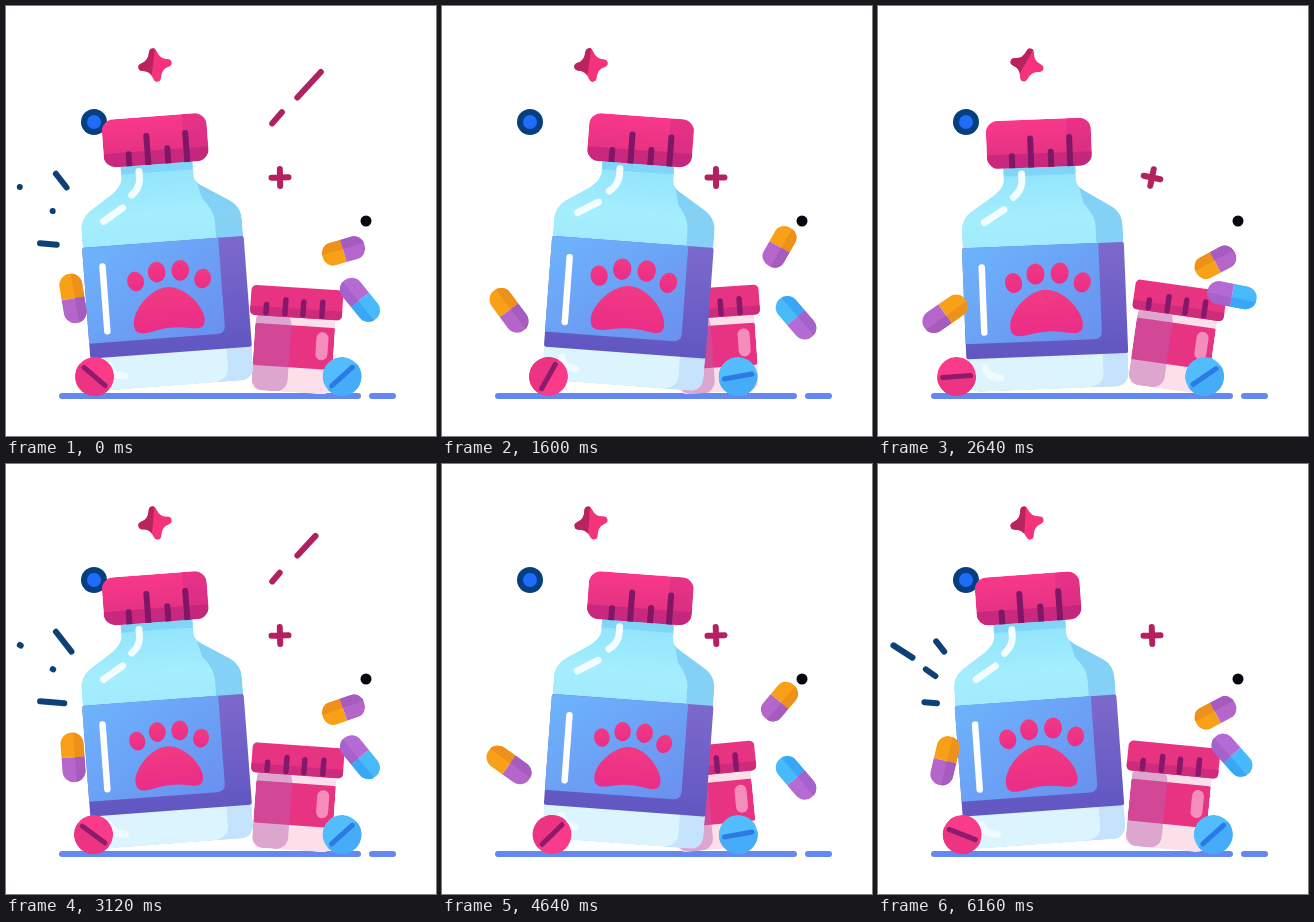
Animation of 430 by 430 pixels, one loop 6.24 s. Source, as an HTML page:

```html
<!DOCTYPE html>
<html lang="en">
<head>
<meta charset="utf-8">
<title>Pet medicine</title>
<style>
html, body { margin: 0; width: 100%; height: 100%; overflow: hidden; background: #fff; }
svg { display: block; width: 100%; height: 100%; }
.line { fill: none; stroke-linecap: round; stroke-linejoin: round; }
</style>
</head>
<body>
<svg viewBox="0 0 430 430">
  <defs>
    <linearGradient id="glassFill" x2="0" y2="1"><stop offset="0" stop-color="#8fe2fc"/><stop offset=".25" stop-color="#a5eefe"/><stop offset="1" stop-color="#8fd2f8"/></linearGradient>
    <linearGradient id="labelFill" x2="1" y2="1"><stop offset="0" stop-color="#6db4fc"/><stop offset="1" stop-color="#6a90ef"/></linearGradient>
    <linearGradient id="sideFill" x2="0" y2="1"><stop offset="0" stop-color="#7d69cc"/><stop offset="1" stop-color="#6157c2"/></linearGradient>
    <linearGradient id="capFill" x2="0" y2="1"><stop offset="0" stop-color="#f9388a"/><stop offset="1" stop-color="#de3082"/></linearGradient>
    <linearGradient id="pawFill" x2="0" y2="1"><stop offset="0" stop-color="#f23a82"/><stop offset="1" stop-color="#ea2d88"/></linearGradient>
    <clipPath id="body"><path d="M-37-224H35V-210C35-202 39-199 46-195L70-180Q80-173 80-160V-16Q80 0 66 0H-66Q-81 0-81-16V-160Q-81-173-71-180L-48-195Q-38-202-37-210Z"/></clipPath>
    <clipPath id="lid"><rect x="-53" y="-270" width="105" height="48" rx="12"/></clipPath>
    <clipPath id="disc"><circle r="19.5"/></clipPath>
    <clipPath id="tube"><rect x="-11.5" y="-25" width="23" height="50" rx="11.5"/></clipPath>
    <clipPath id="jarBody"><path d="M-40-80H40V-10Q40 0 30 0H-30Q-40 0-40-10Z"/></clipPath>
    <clipPath id="starShape"><path d="M0-17Q3-17 4-13Q6-5 13-4Q17-3 17 0Q17 3 13 4Q6 5 4 13Q3 17 0 17Q-3 17-4 13Q-6 5-13 4Q-17 3-17 0Q-17-3-13-4Q-6-5-4-13Q-3-17 0-17Z"/></clipPath>
  </defs>

  <path class="line" stroke="#6488f2" stroke-width="6" d="M56 390H352M366 390H387"/>

  <g id="jar">
    <g clip-path="url(#jarBody)">
      <rect x="-40" y="-80" width="80" height="80" fill="#fbe0ea"/>
      <rect x="-40" y="-67" width="80" height="42" rx="2" fill="#e83383"/>
      <rect x="-40" y="-80" width="36" height="80" rx="12" fill="#b55fae" opacity=".45"/>
      <rect x="22" y="-62" width="12" height="28" rx="6" fill="#f58dba"/>
    </g>
    <rect x="-46" y="-105" width="92" height="30" rx="5" fill="#e83383"/>
    <path d="M-46-84H46V-80Q46-75 41-75H-41Q-46-75-46-80Z" fill="#cf2b7c"/>
    <path class="line" stroke="#85186a" stroke-width="5.5" d="M-30-86V-78M-11-92V-78M7-91V-78M26-92V-78"/>
  </g>

  <circle cx="88" cy="116" r="13" fill="#063f80"/>
  <circle cx="88" cy="116" r="7" fill="#1f6cf8"/>

  <g id="bottle">
    <g id="dashes" class="line"></g>
    <g id="specks" fill="#e09cba"><circle cx="102" cy="-275" r="3.8"/><circle cx="129" cy="-234" r="3.8"/></g>
    <g clip-path="url(#body)">
      <rect x="-81" y="-226" width="162" height="226" fill="url(#glassFill)"/>
      <path d="M-40-226H40V-214H-40Z" fill="#70c8f2" opacity=".5"/>
      <path d="M35-213Q37-201 46-195L95-164V-130H53V-160Q53-172 42-184Z" fill="#78c6f4" opacity=".7"/>
      <rect x="-81" y="-34" width="162" height="34" fill="#dcf4fd"/>
      <path d="M55-34H82V0H40Q55-2 55-14Z" fill="#c6e3fd"/>
      <path class="line" stroke="#effbff" stroke-width="7" d="M-63-24Q-61-14-48-13"/>
    </g>
    <rect x="-81.5" y="-144" width="162" height="111" rx="2" fill="url(#sideFill)"/>
    <path d="M-81.5-142Q-81.5-144-79-144H55V-56Q55-48 47-48H-81.5Z" fill="url(#labelFill)"/>
    <path class="line" stroke="#fff" stroke-width="6.5" d="M-62.5-124V-59"/>
    <path class="line" stroke="#f3fdff" stroke-width="7" d="M-19-216V-208Q-20-199-28-193M-38-181L-58-169"/>
    <g id="paw" fill="url(#pawFill)">
      <path d="M0-27C18-27 36-5 36 8C36 20 26 17 14 15Q0 13-14 16C-27 19-36 20-36 8C-36-6-17-27 0-27Z"/>
      <ellipse cx="-31" cy="-35" rx="8.5" ry="10" transform="rotate(-12 -31 -35)"/>
      <ellipse cx="-9" cy="-43" rx="9" ry="10.5"/>
      <ellipse cx="15" cy="-43" rx="9" ry="10.5" transform="rotate(6 15 -43)"/>
      <ellipse cx="37" cy="-33" rx="8.5" ry="10" transform="rotate(16 37 -33)"/>
    </g>
    <g clip-path="url(#lid)">
      <rect x="-53" y="-270" width="105" height="48" fill="url(#capFill)"/>
      <path d="M28-270H52V-222H28Z" fill="#c02780" opacity=".3"/>
      <path d="M-53-236H52V-222H-53Z" fill="#b4227b" opacity=".55"/>
      <path class="line" stroke="#7f1766" stroke-width="6" d="M-28-234V-219M-9-251V-219M11-237V-219M30-251V-219"/>
    </g>
  </g>

  <g id="star"><g clip-path="url(#starShape)"><rect x="-18" y="-18" width="36" height="36" fill="#f5327c"/><path d="M-18-18H3L-3 3L-8 18H-18Z" fill="#b9235e"/></g></g>
  <path id="plus" class="line" stroke="#b32160" stroke-width="6" d="M0-8.5V8.5M-8.5 0H8.5"/>
  <g id="pills"></g>
  <circle cx="360" cy="215" r="5.5" fill="#05070f"/>
</svg>
<script>
const LOOP = 6240, SWING = 3150, BURST = SWING / 3, BEAT = SWING / 6;
const $ = id => document.getElementById(id);
const make = (parent, tag, attrs) => {
  const el = document.createElementNS("http://www.w3.org/2000/svg", tag);
  for (const key in attrs) el.setAttribute(key, attrs[key]);
  return parent.appendChild(el);
};
const place = (el, x, y, angle = 0, scale = 1) =>
  el.setAttribute("transform", `translate(${x} ${y}) rotate(${angle}) scale(${scale})`);
// Cosine swing that reaches mid + amp when p equals peak
const wave = (p, mid, amp, peak, period = SWING) =>
  mid + amp * Math.cos(2 * Math.PI * (p - peak) / period);
const ramp = (t, from, to) => Math.min(1, Math.max(0, (t - from) / (to - from)));
const easeOut = k => 1 - (1 - k) ** 2;

function capsule(top, topShade, bottom, bottomShade, length = 50) {
  const outer = make($("pills"), "g");
  const g = make(outer, "g", { "clip-path": "url(#tube)", transform: `scale(1 ${length / 50})` });
  const half = (y, x, width, fill) => make(g, "rect", { x, y, width, height: 25, fill });
  half(-25, -12, 24, top);
  half(-25, 2, 10, topShade);
  half(0, -12, 24, bottom);
  half(0, 2, 10, bottomShade);
  return outer;
}

function tablet(fill, shade, slot) {
  const outer = make($("pills"), "g");
  const g = make(outer, "g", { "clip-path": "url(#disc)" });
  make(g, "circle", { r: 19.5, fill });
  make(g, "path", { d: "M-20 0H20V20H-20Z", fill: shade });
  make(g, "path", { d: "M-14 0H14", class: "line", stroke: slot, "stroke-width": 5 });
  return outer;
}

const leftCapsule = capsule("#f8a018", "#ee911a", "#b566cb", "#a55cbe");
const topCapsule = capsule("#f8a018", "#ee911a", "#b566cb", "#a55cbe", 44);
const blueCapsule = capsule("#48bafa", "#3aa6f6", "#b56bd4", "#a562ca");
const pinkTablet = tablet("#fa3b8a", "#ec3483", "#8f1a6c");
const blueTablet = tablet("#52bcfc", "#45adf8", "#2c7be4");

const early = u => [easeOut(ramp(u, 700, 960)), easeOut(ramp(u, 900, 1050)), u > 700 && u < 1210];
const late = u => [easeOut(ramp(u, 885, 970)),
  .6 * easeOut(ramp(u, 1025, 1110)) + .4 * ramp(u, 1170, 1270), u > 885 && u < 1270];
const streak = u => [ramp(u, 920, 1070), ramp(u, 1170, 1310), u > 920 && u < 1310];
const dash = (timing, x1, y1, x2, y2, stroke) => ({
  timing, x1, y1, x2, y2,
  el: make($("dashes"), "line", { stroke, "stroke-width": 6 })
});
const navy = "#0d4075", berry = "#b0215f";
const dashes = [
  dash(early, -117, -193, -139, -209.5, navy),
  dash(early, -97, -174, -108, -183, navy),
  dash(late, -88, -199, -102, -220, navy),
  dash(late, -99, -148, -123, -152, navy),
  dash(streak, 144.5, -278, 173.5, -305, berry),
  dash(streak, 117.5, -254, 129.5, -266, berry)
];

function drawDashes(u) {
  for (const { timing, x1, y1, x2, y2, el } of dashes) {
    const [tip, tail, visible] = timing(u);
    const set = (name, a, b, k) => el.setAttribute(name, a + (b - a) * k);
    set("x1", x1, x2, tail);
    set("y1", y1, y2, tail);
    set("x2", x1, x2, tip);
    set("y2", y1, y2, tip);
    el.setAttribute("visibility", visible ? "visible" : "hidden");
  }
  $("specks").setAttribute("opacity", ramp(u, 1065, 1095) * (1 - ramp(u, 1180, 1250)));
}

// Double heartbeat
function pulse(p) {
  const bump = (at, width) => {
    const d = Math.abs(p % BEAT - at);
    return Math.exp(-((Math.min(d, BEAT - d) / width) ** 2));
  };
  return .91 + .12 * bump(40, 58) + .09 * bump(382, 40);
}

function draw(t) {
  const p = t % SWING;
  const lift = (angle, reach) => reach * Math.abs(Math.sin(angle * Math.PI / 180));

  const tilt = wave(p, 0, -4.3, 0);
  place($("bottle"), wave(p, 174.4, -6.3, 0), 387 - lift(tilt, 100), tilt);
  place($("paw"), 0, -72, 0, pulse(p));
  drawDashes((p - 700 + BURST) % BURST + 700);

  const lean = wave(p, -.3, -8.4, 1040);
  place($("jar"), wave(p, 281, -8, 1040), 389 - lift(lean, 40), lean);

  place($("star"), 149, 59, wave(p, 15, 28, 660, SWING / 2));
  place($("plus"), 274, 171.5, wave(p, 11, 13, 690, SWING / 2));

  place(leftCapsule, 67, wave(p, 298, -16, 610), wave(p, -25, -86, 880));
  place(topCapsule, 337.5, wave(p, 242.5, -15, 870), wave(p, -37, 87, 1250));
  place(blueCapsule, 354, wave(p, 303, 14, 1150), wave(p, 50, 91, -20));

  const pinkX = wave(p, 98, 19.5, 1040), blueX = wave(p, 316, 20, 0);
  place(pinkTablet, pinkX, 370.5, 38 + 4.4 * (pinkX - 88));
  place(blueTablet, blueX, 370.5, -42 + .8 * (336 - blueX));
}

const start = performance.now();
function tick() {
  draw((performance.now() - start) % LOOP);
  requestAnimationFrame(tick);
}
tick();
</script>
</body>
</html>
```
